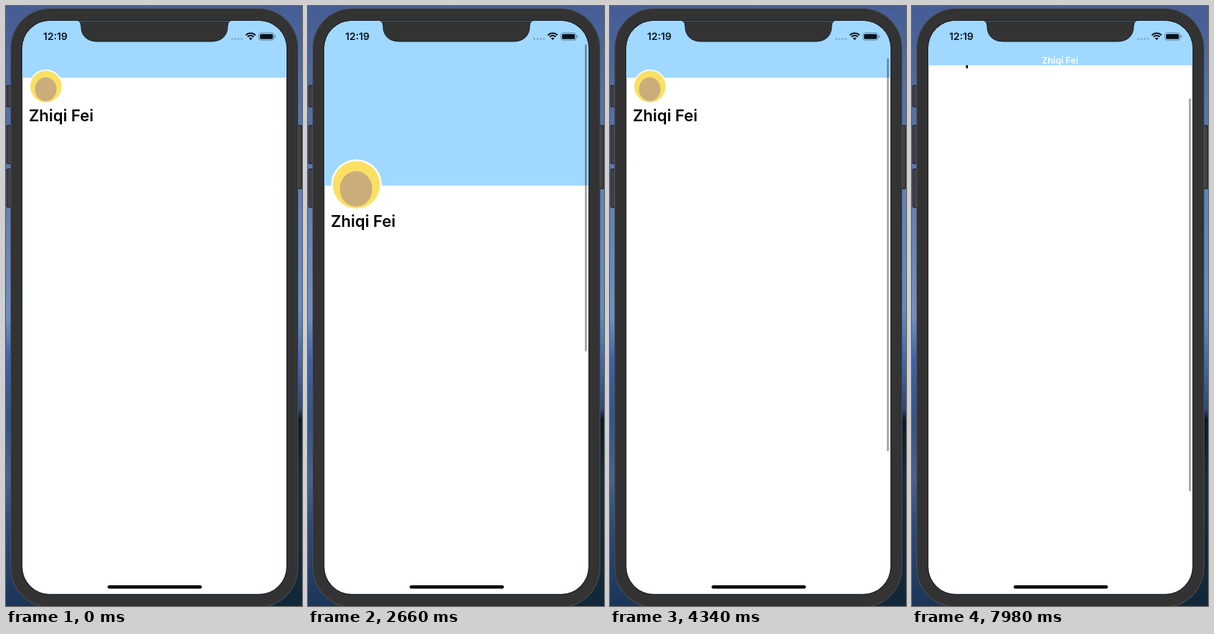
These frames come from a looping animation (402 px wide and 812 px high, 8 s). An HTML page with a canvas:

```html
<!DOCTYPE html>
<html lang="en">
<head>
<meta charset="utf-8">
<title>Stretchy profile header</title>
<style>
  html, body { margin: 0; width: 100%; height: 100%; overflow: hidden; background: #333; }
  canvas { display: block; width: 402px; height: 812px; }
</style>
</head>
<body>
<canvas id="stage" width="402" height="812"></canvas>
<script>
const ctx = document.getElementById('stage').getContext('2d');
const NAME = 'Zhiqi Fei';
const LOOP = 8000, STEP = 70;
const SKY = '#a0d8ff', BODY = '#333333', EDGE = '#14202c', INK = '#06121c';
const HEADER_REST = 126, HEADER_MIN = 80.5, HEADER_RATE = 1.1;
const STOP = (HEADER_REST - HEADER_MIN) / HEADER_RATE;
const NOTCH = new Path2D('M95 19Q102 20 102 27C102 41 111 48 124 48H279C292 48 301 41 301 27Q301 20 308 19');

// [time in ms, scroll offset in px]; negative offsets are an overscroll pull
const SCROLL = [
  [0, 26], [420, 26], [1200, 3], [1890, -28.5], [2450, -108], [2660, -116.5],
  [2710, -116.5], [2850, -66], [3000, -22], [3220, 0], [3560, 0], [4340, 26],
  [5040, 64], [5880, 84], [6230, 98], [6580, 108], [6790, 112.5], [7000, 113],
  [7630, 113], [7980, 102]
];

const slope = i => (SCROLL[i + 1][1] - SCROLL[i][1]) / (SCROLL[i + 1][0] - SCROLL[i][0]);

function tangent(i) {
  if (i === 0 || i === SCROLL.length - 1) return slope(Math.max(0, i - 1));
  const a = slope(i - 1), b = slope(i);
  return a * b <= 0 ? 0 : 2 * a * b / (a + b);
}

// Monotone cubic interpolation, so the drag never overshoots a key
function scrollAt(t) {
  let i = 0;
  while (i < SCROLL.length - 2 && t >= SCROLL[i + 1][0]) i++;
  const [t0, y0] = SCROLL[i], [t1, y1] = SCROLL[i + 1];
  const d = t1 - t0, u = Math.min(1, (t - t0) / d), v = 1 - u;
  return v * v * (1 + 2 * u) * y0 + u * u * (3 - 2 * u) * y1
       + d * u * v * (v * tangent(i) - u * tangent(i + 1));
}

function rect(x, y, w, h, color, r = 0) {
  ctx.fillStyle = color;
  ctx.beginPath();
  ctx.roundRect(x, y, w, h, r);
  ctx.fill();
}

function circle(x, y, r, color) {
  ctx.fillStyle = color;
  ctx.beginPath();
  ctx.arc(x, y, r, 0, 7);
  ctx.fill();
}

function text(str, x, y, size, color, align = 'left') {
  ctx.font = `600 ${size}px Inter, sans-serif`;
  ctx.textAlign = align;
  ctx.fillStyle = color;
  ctx.fillText(str, x, y);
}

function gradient(...stops) {
  const g = ctx.createLinearGradient(0, 0, 0, 812);
  for (const [y, color] of stops) g.addColorStop(y / 812, color);
  return g;
}

function drawWallpaper() {
  rect(0, 0, 201, 812, gradient([0, '#455d94'], [100, '#4f689c'], [260, '#667daf'],
    [420, '#718ec2'], [480, '#3f62a9'], [560, '#345388'], [640, '#48638f'],
    [700, '#304a78'], [812, '#1b3558']));
  rect(201, 0, 201, 812, gradient([0, '#455d94'], [100, '#4f6fa8'], [260, '#5b84c2'],
    [410, '#628dca'], [480, '#3f69b2'], [545, '#2b4a7c'], [560, '#0e1a26'],
    [640, '#182c3a'], [812, '#10283a']));
  let seed = 7;
  const random = () => (seed = seed * 16807 % 2147483647) / 2147483647;
  for (let i = 0; i < 40; i++) {
    rect(random() * 402, random() * 30, 1, 1, `rgba(200,215,255,${random() * 0.5})`);
  }
}

function drawPhone() {
  for (const [x, y, h] of [[0.5, 107, 30], [0.5, 161, 53], [0.5, 220, 53], [394, 161, 87]]) {
    rect(x, y, 8, h, '#222226', 2);
    rect(x + 1, y + 1, 6, h - 2, '#414145', 2);
  }
  rect(6, 3, 391, 811, '#4c4d51', 54);
  rect(7, 4, 389, 809, BODY, 53);
  rect(21, 19, 361, 778, EDGE, 38);
}

function drawAvatar(scroll) {
  const size = 69 - 0.885 * Math.min(Math.max(scroll, 0), STOP);
  const bottom = 160 - (scroll < 0 ? scroll : 1.08 * scroll);
  ctx.save();
  ctx.translate(31.3, bottom - size);
  ctx.scale(size / 69, size / 69);
  circle(34.5, 34.5, 34.5, '#fff');
  circle(34.5, 34.5, 32, '#fae063');
  ctx.fillStyle = '#cbad7c';
  ctx.beginPath();
  ctx.ellipse(34, 40, 22, 24, 0, 0, 7);
  ctx.fill();
  ctx.restore();
}

function drawHeader(bottom, scroll) {
  ctx.save();
  ctx.beginPath();
  ctx.rect(22, 20, 359, bottom - 20);
  ctx.clip();
  ctx.fillStyle = SKY;
  ctx.fillRect(22, 20, 359, bottom - 20);
  if (scroll > STOP) text(NAME, 201, 77.5 + Math.max(0, 95 - scroll), 12.2, '#fff', 'center');
  ctx.restore();
}

function drawStatusBar() {
  ctx.fillStyle = BODY;
  ctx.fill(NOTCH);
  ctx.strokeStyle = EDGE;
  ctx.lineWidth = 1;
  ctx.stroke(NOTCH);
  text('12:19', 67, 46.3, 13.6, INK, 'center');
  for (let i = 0; i < 4; i++) circle(307.3 + i * 4.3, 44.6, 1.5, '#83b0d1');

  ctx.strokeStyle = INK;
  ctx.lineWidth = 2;
  for (const r of [9.3, 5.9]) {
    ctx.beginPath();
    ctx.arc(332.3, 46, r, -Math.PI * 0.75, -Math.PI * 0.25);
    ctx.stroke();
  }
  ctx.fillStyle = INK;
  ctx.fill(new Path2D('M332.3 46.2L329.9 43.6Q332.3 41.8 334.7 43.6Z'));

  ctx.strokeStyle = 'rgba(6,18,28,.4)';
  ctx.lineWidth = 1;
  ctx.beginPath();
  ctx.roundRect(343.5, 36.5, 20.5, 9.7, 2.8);
  ctx.stroke();
  rect(345, 38, 17.5, 6.8, INK, 1.5);
  rect(365, 39.7, 1.3, 3.4, 'rgba(6,18,28,.4)', 1);
}

function drawScreen(t) {
  const scroll = scrollAt(t);
  const rate = scroll < 0 ? 1 : HEADER_RATE;
  const headerBottom = Math.max(HEADER_MIN, Math.round(HEADER_REST - rate * scroll));
  const pinned = scroll > STOP;

  ctx.save();
  ctx.beginPath();
  ctx.roundRect(22.3, 20.2, 358.5, 775.6, 37);
  ctx.clip();
  ctx.fillStyle = '#fff';
  ctx.fillRect(22, 20, 359, 776);

  text(NAME, 31, 182.2 - scroll, 21.6, '#000');
  if (pinned) drawAvatar(scroll);
  drawHeader(headerBottom, scroll);
  if (!pinned) drawAvatar(scroll);

  const barAlpha = 0.35 * Math.min(1, Math.max(0, (t - 400) / 140));
  rect(376, 52 + 0.715 * Math.max(scroll, 0), 2.8, 532 + Math.min(scroll, 0),
    `rgba(0,0,0,${barAlpha})`, 1.4);
  drawStatusBar();
  rect(138, 784, 128, 4.4, '#000', 2.2);
  ctx.restore();
}

function frame(now) {
  const t = Math.floor((now % LOOP) / STEP) * STEP;
  drawWallpaper();
  drawPhone();
  drawScreen(t);
  requestAnimationFrame(frame);
}
frame(performance.now());
</script>
</body>
</html>
```
